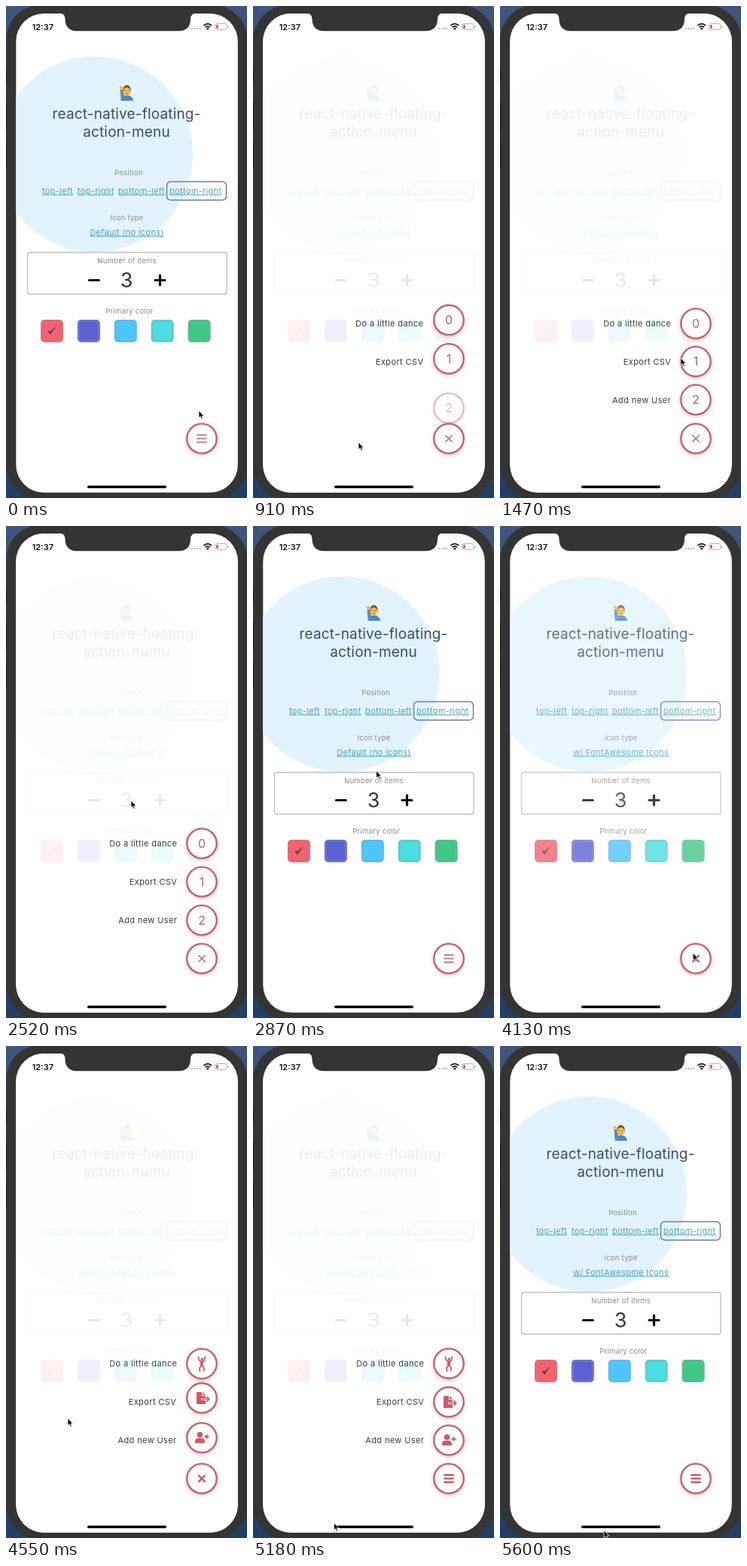
These frames come from a looping animation (320x654 px, 5.67 s). An HTML page:

```html
<!DOCTYPE html>
<html lang="en">
<head>
<meta charset="utf-8">
<title>Floating action menu</title>
<style>
  html, body { margin: 0; height: 100%; overflow: hidden; background: #2b446c; }
  svg { display: block; width: 320px; height: 654px; }
  text { font-family: Inter, Roboto, sans-serif; }
  .mid { text-anchor: middle; }
  .title { font-size: 19px; letter-spacing: .17px; fill: #3d4a6b; }
  .caption { font-size: 9.5px; letter-spacing: .25px; fill: #8a8a8a; }
  .link {
    font-size: 11px; letter-spacing: .33px; fill: #4aa5c4;
    text-decoration: underline; text-decoration-thickness: 1px; text-underline-offset: 1px;
  }
  .label { font-size: 11px; letter-spacing: .38px; fill: #3c3c3c; text-anchor: end; }
  .digit { font-size: 16px; fill: #b0616f; text-anchor: middle; }
  .ring { fill: #fff; stroke: #c0616c; stroke-width: 2.3; }
  .disc { filter: drop-shadow(0 1px 2px rgba(226, 105, 116, .5)); }
  .thin { fill: none; stroke: #c0606d; stroke-width: 1.4; }
  .bold { fill: none; stroke: #cc5a66; stroke-width: 2.5; }
  .line { fill: none; stroke: #cc5a66; stroke-width: 1.8; stroke-linejoin: round; }
  .solid { fill: #cc5a66; }
</style>
</head>
<body>
<svg viewBox="0 0 320 654">
  <defs>
    <clipPath id="screen"><rect x="13.300" y="10" width="294.500" height="636.800" rx="37"/></clipPath>
    <linearGradient id="desk" x2="0" y2="1">
      <stop stop-color="#40557c"/><stop offset="1" stop-color="#213d68"/>
    </linearGradient>
  </defs>

  <rect width="320" height="654" fill="url(#desk)"/>
  <rect x="0" y="-2" width="321" height="659" rx="48" fill="#343435"/>
  <path d="M.5 82v21M.5 127v41M.5 176v40" stroke="#1b1c20"/>
  <rect x="13.300" y="10" width="294.500" height="636.800" rx="37" fill="#fff"/>

  <g clip-path="url(#screen)">
    <circle cx="118" cy="197" r="130" fill="#e2f3fd"/>

    <g id="person">
      <path d="M153 126q0-7.500 7.500-7.500t8.500 7.500z" fill="#4d86c8"/>
      <path d="M151.500 111h3.200l3 10-3 5h-2z" fill="#5a8cc4"/>
      <circle cx="153" cy="108.500" r="2.200" fill="#f3b93a"/>
      <ellipse cx="160.500" cy="111.500" rx="5.200" ry="6.500" fill="#7a5230"/>
      <ellipse cx="160.500" cy="113.500" rx="4.600" ry="5.300" fill="#f7c443"/>
      <path d="M158.500 116q2 1.500 4 0" fill="none" stroke="#8a5a20" stroke-width=".9"/>
      <circle cx="158.700" cy="112.500" r=".7" fill="#5b3a1c"/>
      <circle cx="162.300" cy="112.500" r=".7" fill="#5b3a1c"/>
    </g>

    <text class="title mid" x="160" y="150">react-native-floating-</text>
    <text class="title mid" x="160" y="174">action-menu</text>

    <text class="caption mid" x="163" y="225">Position</text>
    <text class="link" x="48" y="249.500">top-left</text>
    <text class="link" x="95" y="249.500">top-right</text>
    <text class="link" x="149" y="249.500">bottom-left</text>
    <text class="link" x="217" y="249.500">bottom-right</text>
    <rect x="213.500" y="233.500" width="79" height="24.500" rx="5" fill="none" stroke="#6c7ea3" stroke-width="1.500"/>

    <text class="caption mid" x="160.500" y="284.500">Icon type</text>
    <text class="link mid" id="iconType" x="160.500" y="304.500"></text>

    <rect x="28.500" y="327.500" width="264.500" height="55.500" rx="3" fill="none" stroke="#bdbdbd" stroke-width="1.300"/>
    <text class="caption mid" x="160.500" y="341.500">Number of items</text>
    <path d="M110.500 364.500h12.800M198 364.500h13M204.500 358v13" stroke="#0c0c0c" stroke-width="3.200" stroke-linecap="round"/>
    <text class="mid" x="160" y="373.500" font-size="27" fill="#333">3</text>

    <text class="caption mid" x="164" y="409">Primary color</text>
    <g id="swatches"></g>
    <path d="M56 432.500l3.200 4q2.500-5.500 7-9.500-4.500 2.500-7.500 6.500l-1.200-2z" fill="#58383f" stroke="#58383f" stroke-width=".5"/>

    <rect id="veil" x="13" y="10" width="295" height="637" fill="#fff"/>
    <g id="menu"></g>
    <g class="disc" transform="translate(260 575)">
      <circle class="ring" r="19.700"/>
      <g id="fab"></g>
    </g>
  </g>

  <path d="M70 9q8.500 .5 8.500 8.500c0 10 6 15.800 15.500 15.800h135.500c9.500 0 15.500-5.800 15.500-15.800q0-8 8.500-8.500z" fill="#343435"/>
  <text x="34.700" y="31.500" font-size="11" font-weight="600" fill="#111">12:37</text>
  <path d="M246 30h13" stroke="#b9b9b9" stroke-width="2" stroke-dasharray="2 1.500"/>
  <g fill="none" stroke="#111" stroke-width="1.700">
    <path d="M262.500 26q5.300-4.600 10.600 0M264.600 28.300q3.200-2.700 6.400 0"/>
    <circle cx="267.800" cy="30.300" r=".6"/>
  </g>
  <rect x="277.500" y="23.500" width="15.500" height="8" rx="2.200" fill="#fff" stroke="#b4b4b4"/>
  <rect x="279" y="25" width="2.800" height="5" rx=".8" fill="#ee4b46"/>
  <path d="M294.700 26v3" stroke="#b4b4b4" stroke-width="1.300"/>
  <rect x="108" y="637.500" width="105" height="3.500" rx="1.700" fill="#050505"/>

  <path id="cursor" d="M0 0v9.600l2.200-2 1.500 3.500 1.700-.7-1.500-3.400h2.900z" fill="#0a0a0a" stroke="#fff" stroke-width=".7"/>
</svg>

<script>
const LOOP = 5670, STEP = 70;
const SWITCH_ICONS = 3180;
// Menu sessions: when it is opened and closed
const sessions = [{ open: 500, close: 2600 }, { open: 4050, close: 5180 }];
const FIRST_ITEM = 140, STAGGER = 100, RISE = 18;

// Pointer stops: time, x, y
const stops = [
  [0, 256, 538], [280, 262, 568], [520, 262, 570], [910, 140, 580], [1150, 150, 545],
  [1470, 240, 468], [1900, 268, 525], [2450, 166, 365], [2640, 166, 365],
  [3050, 162, 298], [3230, 162, 298], [3680, 264, 558], [4080, 262, 570],
  [4550, 82, 495], [4750, 45, 545], [5060, 105, 634], [5230, 108, 634], [5600, 138, 644]
];

const $ = id => document.getElementById(id);
const clamp = x => Math.max(0, Math.min(1, x));
const smooth = x => x * x * (3 - 2 * x);

// Underdamped spring from 0 to 1
function spring(ms) {
  if (ms <= 0) return 0;
  const s = ms / 1000, decay = 5, freq = 14.33;
  return 1 - Math.exp(-decay * s) * (Math.cos(freq * s) + decay / freq * Math.sin(freq * s));
}

const fabIcons = {
  menu: 'M-6.700 -4.700h13.400M-6.700 0h13.400M-6.700 4.700h13.400',
  cross: 'M-4.600 -4.600l9.200 9.200M4.600 -4.600l-9.200 9.200'
};

const itemIcons = [
  `<circle class="solid" cx=".5" cy="-6" r="1.800"/>
   <path class="line" stroke-linecap="round" d="M-4.500 -9l.8 4.500 3.200 1.500 4-1 .8-5M-1 3l-2 3 .5 4M1 3l2 3-.5 3.500"/>
   <path class="solid" d="M-2 -3.500h4.500l-.8 7.500h-3.700z"/>`,
  `<path class="solid" d="M-7 -8h7v5h5v3h-6v3h6v5h-12z"/>
   <path class="solid" d="M1 -8l4 4h-4z"/>
   <path class="line" d="M0 1.500h9M6.500 -1.800l3.300 3.300-3.300 3.300"/>`,
  `<circle class="solid" cx="-2.500" cy="-4" r="3.800"/>
   <path class="solid" d="M-9 7v-2q0-4.500 4.500-4.500h4q4.500 0 4.500 4.500v2z"/>
   <path class="line" d="M3.500 -1.500h6M6.500 -4.500v6"/>`
];

$('swatches').innerHTML = ['#f0636e', '#5a62d2', '#4dc6ff', '#4adee0', '#3fc883'].map((c, i) =>
  `<g transform="translate(${46 + i * 48.9} 417)">
    <rect width="30" height="30" rx="5" fill="${c}"/>
    <rect x="1.500" y="1.500" width="27" height="27" rx="3.500" fill="none"
      stroke="#969fae" stroke-opacity="${i ? .3 : .1}" stroke-width="3"/></g>`).join('');

$('fab').innerHTML = ['thin', 'bold'].map(w => Object.entries(fabIcons).map(([name, d]) =>
  `<path class="${w}" data-key="${w}-${name}" d="${d}"/>`).join('')).join('');

const items = ['Do a little dance', 'Export CSV', 'Add new User'].map((name, i) => {
  const group = document.createElementNS('http://www.w3.org/2000/svg', 'g');
  group.innerHTML = `<text class="label" y="${426 + i * 51}">${name}</text>
    <g class="disc"><circle class="ring" r="19.700"/>
      <text class="digit" y="5.700">${i}</text><g>${itemIcons[i]}</g></g>`;
  $('menu').append(group);
  const [label, disc] = group.children;
  const [, digit, icon] = disc.children;
  return { group, label, disc, digit, icon, y: 422 + i * 51 };
});

const show = (el, on) => el.setAttribute('display', on ? 'inline' : 'none');

function pointer(t) {
  const n = stops.findIndex(s => s[0] > t);
  if (n < 0) return stops[stops.length - 1].slice(1);
  const [t0, x0, y0] = stops[n - 1], [t1, x1, y1] = stops[n];
  const k = smooth((t - t0) / (t1 - t0));
  return [x0 + (x1 - x0) * k, y0 + (y1 - y0) * k];
}

function render(t) {
  const session = sessions.filter(s => t >= s.open).pop();
  const isOpen = !!session && t < session.close;
  const custom = t >= SWITCH_ICONS;
  const fade = session ? 1 - smooth(clamp((t - session.close) / 260)) : 0;
  const shown = session ? smooth(clamp((t - session.open) / 260)) : 0;

  $('veil').setAttribute('opacity', .9 * shown * fade);
  $('iconType').textContent = custom ? 'w/ FontAwesome Icons' : 'Default (no icons)';

  const key = `${custom ? 'bold' : 'thin'}-${isOpen ? 'cross' : 'menu'}`;
  for (const path of $('fab').children) show(path, path.dataset.key === key);

  items.forEach((it, i) => {
    const v = session ? spring(t - session.open - FIRST_ITEM - i * STAGGER) * fade : 0;
    show(it.group, v > .01);
    it.disc.setAttribute('transform', `translate(260 ${it.y + (1 - v) * RISE})`);
    it.disc.setAttribute('opacity', clamp(v));
    it.label.setAttribute('x', 227.3 - (v - 1) * 4);
    it.label.setAttribute('opacity', clamp(v * 2 - 1));
    show(it.digit, !custom);
    show(it.icon, custom);
  });

  $('cursor').setAttribute('transform', `translate(${pointer(t)})`);
}

const start = performance.now();
function tick() {
  const t = (performance.now() - start) % LOOP;
  render(Math.floor(t / STEP) * STEP);
  requestAnimationFrame(tick);
}
tick();
</script>
</body>
</html>
```
